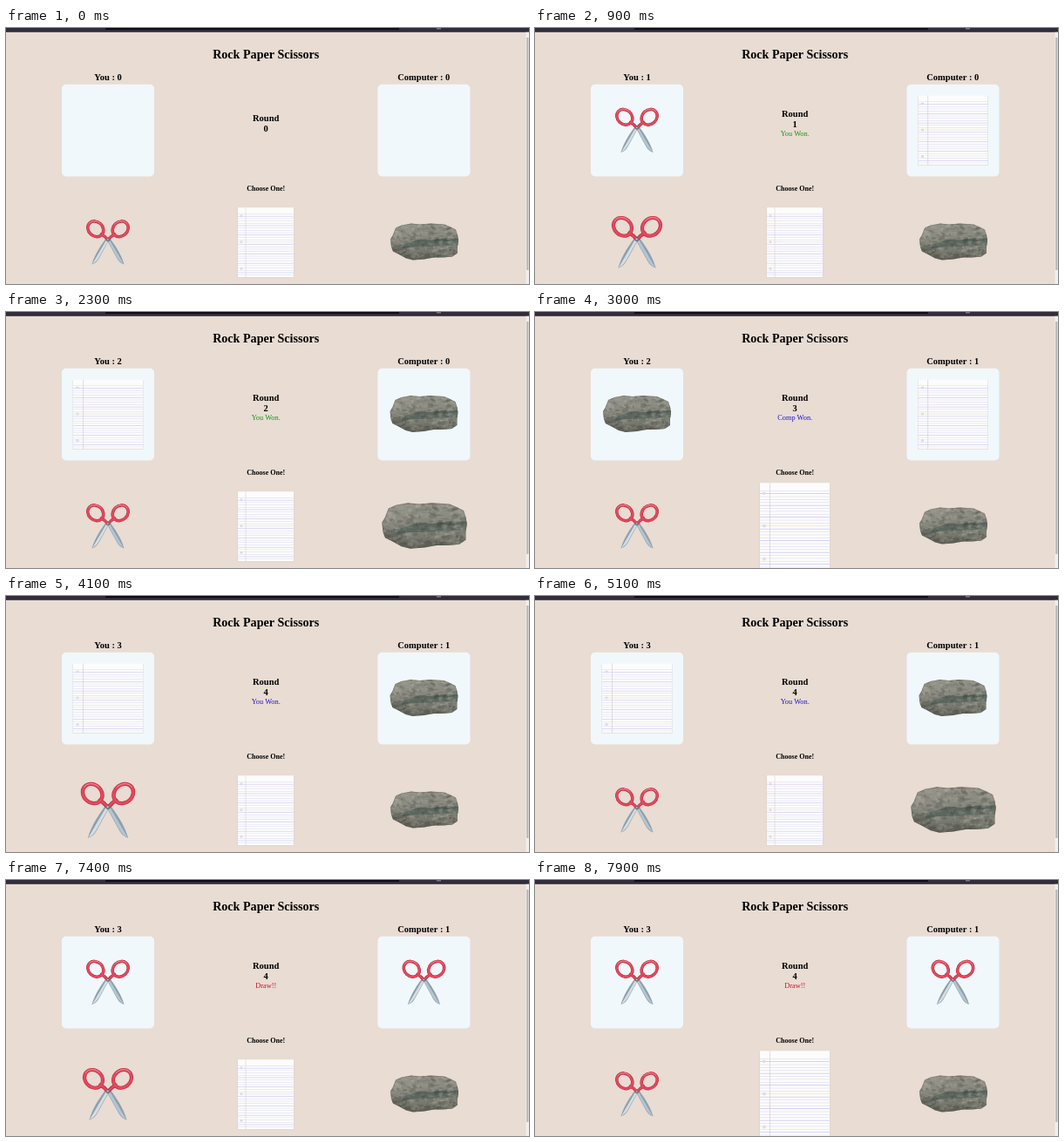
Write an HTML page with a canvas that moves like this. It is 600 px wide and 294 px high and loops after 8000 ms.

```html
<!DOCTYPE html>
<html lang="en">
<head>
<meta charset="utf-8">
<title>Rock Paper Scissors</title>
<style>
html, body { margin: 0; width: 100%; height: 100%; overflow: hidden; background: #e8dcd3; }
canvas { display: block; width: 600px; height: 294px; }
</style>
</head>
<body>
<canvas id="stage" width="600" height="294"></canvas>
<script>
const ctx = document.getElementById('stage').getContext('2d');
const LOOP = 8000, GROW = 300;
const GREEN = '#159415', BLUE = '#2411cf', RED = '#d40f25';

// Pointer intervals [enter, leave] over each choice
const hovers = {
  scissors: [[70, 850], [3800, 4150], [5970, 7350]],
  paper: [[1150, 1650], [2650, 3650], [7550, 9000]],
  rock: [[1950, 2550], [4750, 5750]]
};

// Game state after each click
const states = [
  { at: 0, you: 0, comp: 0 },
  { at: 550, you: 1, comp: 0, left: 'scissors', right: 'paper', msg: 'You Won.', color: GREEN },
  { at: 1450, you: 2, comp: 0, left: 'paper', right: 'rock', msg: 'You Won.', color: GREEN },
  { at: 2350, you: 2, comp: 1, left: 'rock', right: 'paper', msg: 'Comp Won.', color: BLUE },
  { at: 3150, you: 3, comp: 1, left: 'paper', right: 'rock', msg: 'You Won.', color: BLUE },
  { at: 5150, you: 3, comp: 1, left: 'rock', right: 'rock', msg: 'Draw!!', color: RED },
  { at: 6550, you: 3, comp: 1, left: 'scissors', right: 'scissors', msg: 'Draw!!', color: RED }
];

const ease = p => 1 - (1 - Math.min(1, Math.max(0, p))) ** 2.3;

function zoom(name, t) {
  let k = 0;
  for (const [on, off] of hovers[name])
    k = Math.max(k, ease((t - on) / GROW) - ease((t - off) / GROW));
  return 1 + k / 4;
}

let seed = 7;
const rand = () => (seed = seed * 16807 % 2147483647) / 2147483647;
const specks = Array.from({ length: 420 }, () => ({
  x: rand() * 78 - 39, y: rand() * 44 - 22, w: 0.8 + rand() * 3, h: 0.6 + rand() * 1.6,
  color: rand() < 0.5 ? '52,54,48' : '188,187,176', alpha: 0.06 + rand() * 0.16
}));

function rect(x, y, w, h, color) {
  ctx.fillStyle = color;
  ctx.fillRect(x, y, w, h);
}

function oval(x, y, rx, ry, color) {
  ctx.beginPath();
  ctx.ellipse(x, y, rx, ry, 0, 0, 7);
  ctx.fillStyle = color;
  ctx.fill();
}

function text(s, x, y, size, color = '#000', weight = 'bold') {
  ctx.font = `${weight} ${size}px "Liberation Serif", "Times New Roman", serif`;
  ctx.textAlign = 'center';
  ctx.fillStyle = color;
  ctx.fillText(s, x, y);
}

function stroke(path, color, width) {
  ctx.strokeStyle = color;
  ctx.lineWidth = width;
  ctx.stroke(path);
}

const rockShape = new Path2D('M-39-3 L-36-8 -33-16 -26-19 -15-21 -5-20 8-21 23-20 30-17 36-14 38-8 39-2 38 6 38 13 32 17 22 18 11 18 0 20 -13 21 -21 19 -30 14 -36 11 -38 6Z');
const rockBand = new Path2D('M-14 0 L-4-3 8-2 22-4 39-4 39 4 24 4 12 5 0 6 -14 6 -26 8 -24 3Z');
const blade = new Path2D('M-2.6-5 L1.4-5.5 C7 2 15 13 18.6 25.5 Q13.5 24 10.6 19 Z');
const bladeShine = new Path2D('M-1.6-4 L11 18.5 Q13.6 23 18 25 L1-4Z');
const handle = new Path2D('M-7.5-9 Q-3.5-7 -1-3.5');

const art = {
  scissors() {
    ctx.lineCap = 'round';
    for (const side of [-1, 1]) {
      ctx.save();
      ctx.scale(side, 1);
      ctx.fillStyle = '#8f9fab';
      ctx.fill(blade);
      ctx.fillStyle = side > 0 ? '#b4c6d3' : '#d3dee5';
      ctx.fill(bladeShine);
      ctx.restore();
    }
    for (const side of [-1, 1]) {
      ctx.save();
      ctx.scale(side, 1);
      const ring = new Path2D();
      ring.ellipse(-14.2, -15.2, 9.7, 8.2, 0.75, 0, 7);
      stroke(handle, '#bd2a40', 3.6);
      stroke(ring, '#bd2a40', 3.5);
      stroke(handle, '#e0485b', 2.2);
      stroke(ring, '#e34a5d', 2.3);
      const shine = new Path2D();
      shine.ellipse(-14.2, -15.5, 9.8, 8.3, 0.75, 3, 4.8);
      stroke(shine, '#f18f99', 0.8);
      ctx.restore();
    }
    oval(0, -2.6, 1.9, 1.9, '#6c7780');
    oval(-0.3, -3, 0.8, 0.8, '#c2ccd2');
  },

  paper(w = 80) {
    ctx.save();
    ctx.scale(w / 80, 1);
    rect(-40.3, -39.5, 80.6, 80, '#d2c9c2');
    rect(-40, -40, 80, 80, '#fcfcfc');
    for (let i = 0; i < 27; i++)
      rect(-40, -33 + i * 2.7, 80, 0.55, i % 4 == 1 ? '#c4bff2' : '#dedcf1');
    rect(-40, -1.8, 80, 2.2, 'rgba(246,242,212,.45)');
    rect(-29, -40, 0.6, 80, '#d9c6c1');
    for (const y of [-30.5, -0.5, 30]) {
      oval(-35, y, 1.5, 1.3, '#bdbcc8');
      oval(-35, y, 1.1, 0.9, '#eae9ee');
    }
    ctx.restore();
  },

  rock() {
    ctx.save();
    ctx.clip(rockShape);
    const shade = ctx.createLinearGradient(0, -22, 0, 22);
    shade.addColorStop(0, '#96958b');
    shade.addColorStop(0.45, '#85857b');
    shade.addColorStop(0.75, '#77786e');
    shade.addColorStop(1, '#58584f');
    rect(-40, -23, 80, 46, shade);
    ctx.fillStyle = '#5b665e';
    ctx.fill(rockBand);
    oval(-31, -8, 5, 5, 'rgba(168,166,155,.5)');
    oval(-29, 9, 9, 6, 'rgba(58,60,53,.3)');
    for (const s of specks) oval(s.x, s.y, s.w, s.h, `rgba(${s.color},${s.alpha})`);
    stroke(rockShape, 'rgba(60,60,52,.22)', 1.5);
    ctx.restore();
  }
};

function put(name, x, y, scale = 1, width) {
  if (!name) return;
  ctx.save();
  ctx.translate(x, y);
  ctx.scale(scale, scale);
  art[name](width);
  ctx.restore();
}

function box(x, pick) {
  ctx.beginPath();
  ctx.roundRect(x - 53, 64.7, 106, 105.8, 5);
  ctx.fillStyle = '#f0f8fc';
  ctx.fill();
  put(pick, x, pick == 'rock' ? 117 : 117.5);
}

function browserEdges() {
  rect(0, 0, 600, 4.8, '#302c3c');
  rect(114, 0, 337, 2, '#0d0c14');
  rect(494, 0, 5, 1.5, '#777482');
  rect(596.5, 4.8, 3.5, 290, '#f0eeee');
  rect(597.2, 11, 2.3, 267, '#b9b7b7');
}

function draw(t) {
  const s = states.findLast(state => state.at <= t);
  const top = s.msg ? 101.8 : 106.8;
  rect(0, 0, 600, 294, '#e8dcd3');
  browserEdges();
  text('Rock Paper Scissors', 298.2, 35, 14.1);
  text('You : ' + s.you, 117, 59.5, 10.5);
  text('Computer : ' + s.comp, 479.3, 59.5, 10.5);
  box(117, s.left);
  box(479.5, s.right);
  text('Round', 298.2, top, 10.5);
  text(s.you + s.comp, 298.2, top + 12, 10.5);
  if (s.msg) text(s.msg, 298.2, 124, 8.3, s.color, 'normal');
  text('Choose One!', 298.2, 186.7, 8.05);
  put('scissors', 117, 246, zoom('scissors', t));
  put('paper', 298, 246.2, zoom('paper', t), 64);
  put('rock', 480, 245.5, zoom('rock', t));
}

const start = performance.now();
function tick() {
  draw((performance.now() - start) % LOOP);
  requestAnimationFrame(tick);
}
tick();
</script>
</body>
</html>
```
